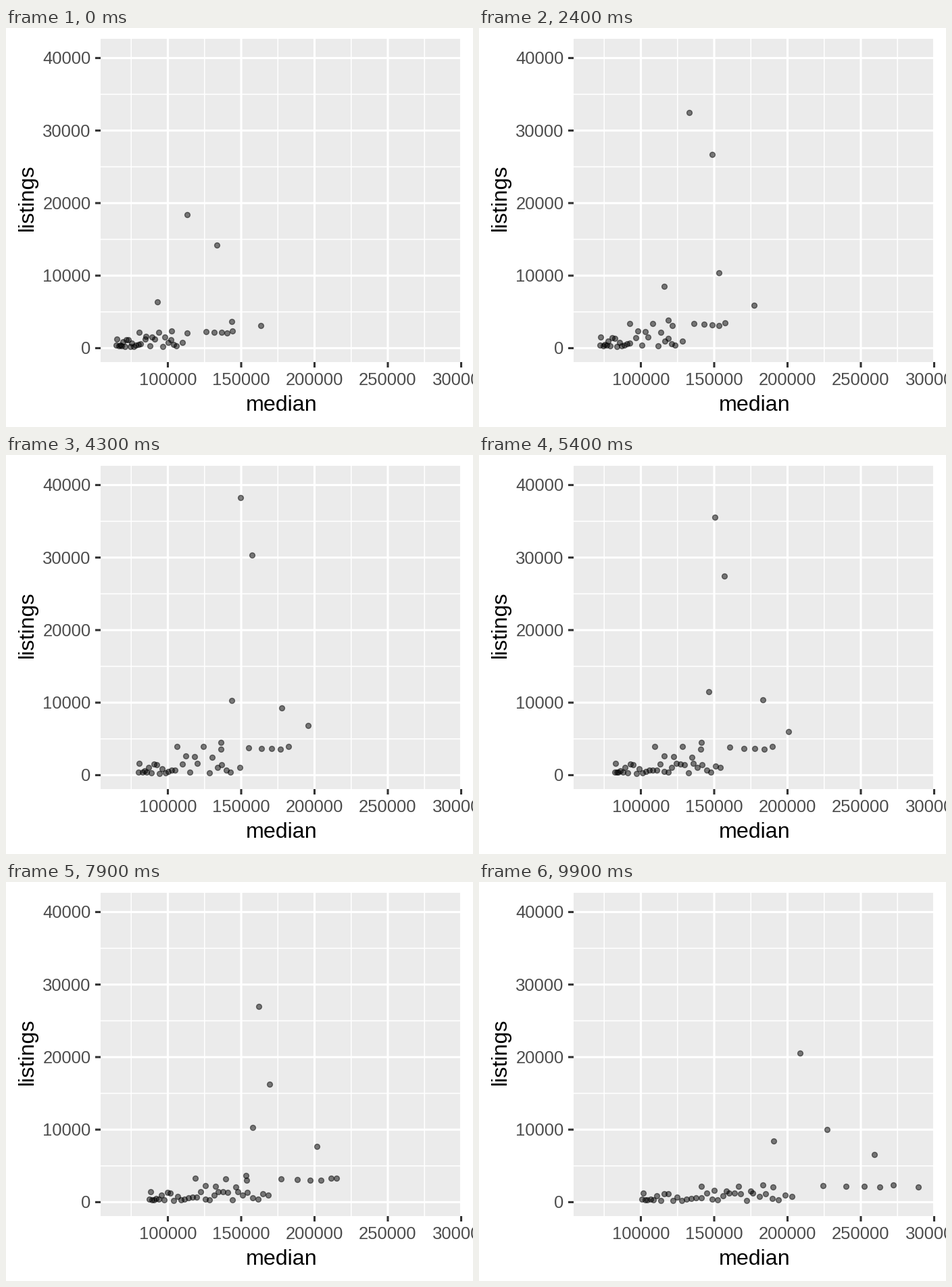
Animation, 691 px wide and 590 px high, one loop 10000 ms. Source, as a matplotlib script:

```python
import numpy as np
import matplotlib.pyplot as plt
from matplotlib.animation import FuncAnimation
from matplotlib.patches import Rectangle

W, H, DPI = 691, 590, 64
FRAMES, INTERVAL = 100, 100
LAST = FRAMES - 1
PX = 72 / DPI  # points per pixel
LEFT, TOP, RIGHT, BOTTOM = 140, 16, 675, 494

plt.rcParams.update({"font.family": "Liberation Sans", "path.snap": False})
rng = np.random.default_rng(12)

# Key points of the large cities, which stand clear of the crowd
TIMES = [0, 8, 24, 43, 64, 79, LAST]
CITIES = [
    ([312.5, 329.5, 345, 364.5, 362.5, 390, 515.5],
     [321, 278, 187, 148, 207.5, 298.5, 366]),
    ([224.5, 239.5, 274.5, 334, 346, 365, 436],
     [404.5, 400, 382, 363, 338.5, 362.5, 383]),
    ([334.5, 349.5, 355.5, 408, 431.5, 460.5, 585],
     [434, 393.5, 362, 374, 351.5, 391, 403]),
    ([377.5, 396.5, 407, 447.5, 467, 489.5, 650.5],
     [439.5, 429, 409.5, 399.5, 418.5, 438, 451]),
]
# The largest one has two peaks, so its height gets its own times
PEAK_X = [268, 288, 311.5, 347, 351.5, 374, 475]
PEAK_T = [0, 8, 24, 33, 39.6, 46.2, 59.4, 66, 72.6, 79, 86, LAST]
PEAK_Y = [275.5, 242.5, 125, 91, 91, 37.5, 130, 80.5, 97, 183.5, 256, 252.5]


def growth(t):
    """Share of the whole rise in median price reached at time t."""
    return np.interp(t, TIMES, [0, 0.09, 0.2, 0.42, 0.53, 0.63, 1])


def band(n, start, end, base, rise, skew, power):
    """Columns for n towns: start x, gain in x, power, base y, rise in y."""
    rank = np.linspace(0, 1, n) ** skew
    x0 = start[0] + (start[1] - start[0]) * rank
    x1 = end[0] + (end[1] - end[0]) * rank
    size = rng.random(n) ** 1.5
    y = base[0] + (base[1] - base[0]) * size
    lift = rise[0] + (rise[1] - rise[0]) * size
    return np.array([x0, x1 - x0, np.full(n, power), y, lift])


SMALL = 32
TOWNS = np.hstack([
    band(SMALL, (163.5, 261), (241, 463), (471, 459), (0.5, 4), 1.4, 1),
    band(6, (197, 245), (329.5, 420), (457, 447), (10, 24), 1, 1),
    band(6, (268, 335), (435.5, 613.5), (451, 447), (16, 18), 0.55, 1.4),
])
# Some small towns report only in the second half
LATE = np.zeros(TOWNS.shape[1], bool)
LATE[rng.choice(SMALL, 8, replace=False)] = True


def positions(t):
    large = [(np.interp(t, TIMES, xs), np.interp(t, TIMES, ys)) for xs, ys in CITIES]
    large.append((np.interp(t, TIMES, PEAK_X), np.interp(t, PEAK_T, PEAK_Y)))
    x0, gain, power, base, rise = TOWNS
    x = x0 + gain * growth(t) ** power
    y = base - rise * np.sin(np.pi * t / LAST)
    towns = np.column_stack([x, y])
    return np.vstack([large, towns if t > LAST / 2 else towns[~LATE]])


fig = plt.figure(figsize=(W / DPI, H / DPI), dpi=DPI, facecolor="white")
ax = fig.add_axes([0, 0, 1, 1])
ax.set(xlim=(0, W), ylim=(H, 0))
ax.axis("off")


def x_at(median):
    return 239.5 + (median - 100000) * 108.5 / 50000


def y_at(listings):
    return 473.4 - listings * 107.25 / 10000


def grid(xs, ys, width):
    style = dict(colors="white", linewidths=width * PX, zorder=2)
    ax.vlines(xs, TOP, BOTTOM, **style)
    ax.hlines(ys, LEFT, RIGHT, **style)


def label(x, y, text, size, color, **kw):
    ax.text(x, y, text, fontsize=size * PX, color=color, va="baseline", **kw)


ax.add_patch(Rectangle((LEFT, TOP), RIGHT - LEFT, BOTTOM - TOP,
                       facecolor="#EBEBEB", linewidth=0, zorder=1))
medians = np.arange(100000, 300001, 50000)
counts = np.arange(0, 40001, 10000)
grid(x_at(medians - 25000), y_at(counts[:-1] + 5000), 1.55)
grid(x_at(medians), y_at(counts), 3.1)

tick = dict(colors="#333333", linewidths=3.1 * PX, zorder=2)
ax.vlines(x_at(medians), BOTTOM, BOTTOM + 8, **tick)
ax.hlines(y_at(counts), LEFT - 8, LEFT, **tick)
for m in medians:
    label(x_at(m), 527.5, str(m), 25.6, "#4D4D4D", ha="center")
for c in counts:
    label(125.6, y_at(c) + 9, str(c), 25.6, "#4D4D4D", ha="right")
label(407.5, 566, "median", 32.3, "black", ha="center")
label(39.7, 250.5, "listings", 32.3, "black", ha="center",
      rotation=90, rotation_mode="anchor")

dots = ax.scatter([], [], s=(7.8 * PX) ** 2, facecolors=(0, 0, 0, 0.5),
                  edgecolors=(0, 0, 0, 0.5), linewidths=1.42 * PX, zorder=3)


def update(t):
    dots.set_offsets(positions(t))
    return [dots]


anim = FuncAnimation(fig, update, frames=FRAMES, interval=INTERVAL,
                     repeat=True, repeat_delay=0, blit=False)
plt.show()
```
